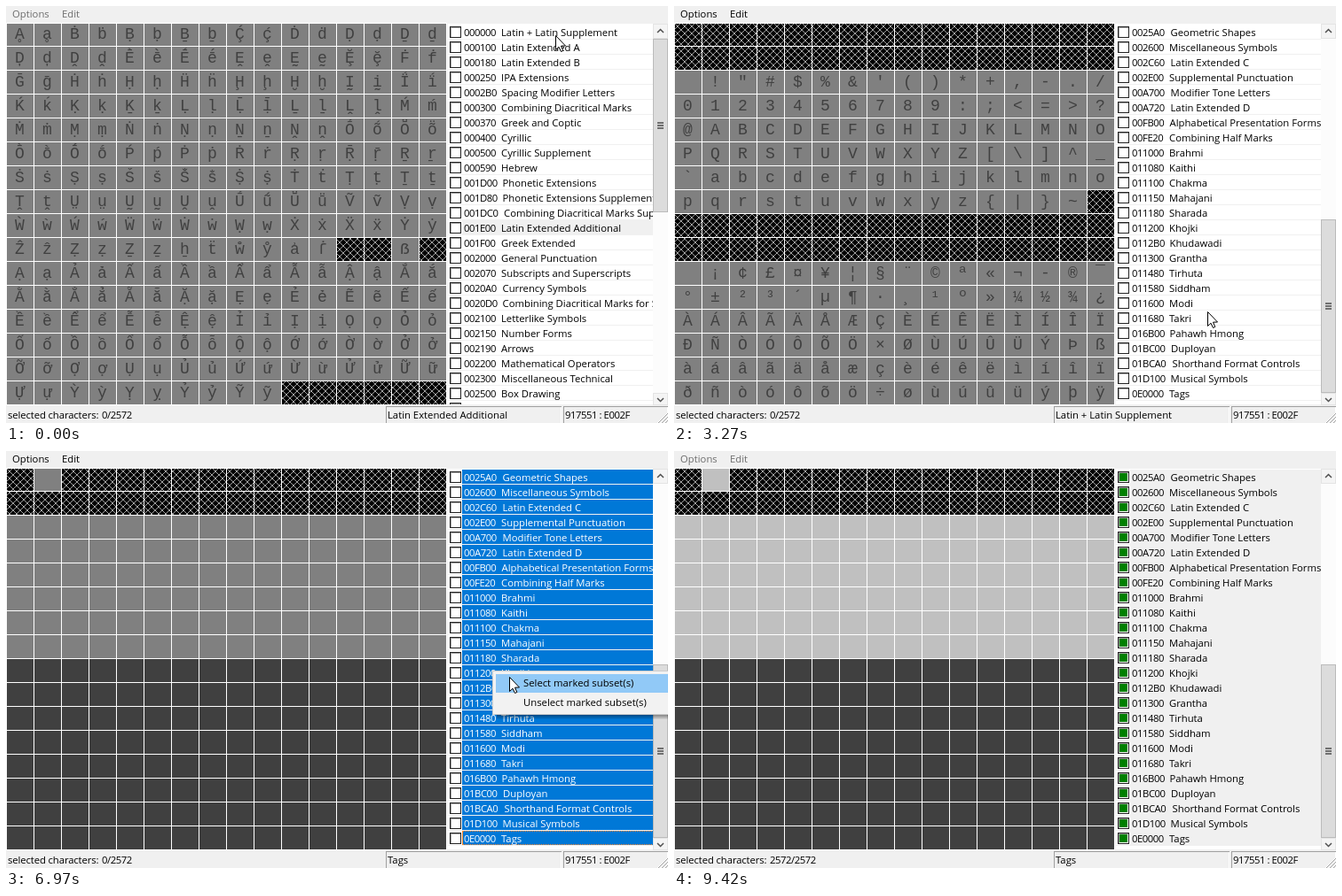
These frames come from a looping animation (746 px wide and 471 px high, 9500 ms). An HTML page with a canvas:

```html
<!DOCTYPE html>
<html lang="en">
<head>
<meta charset="utf-8">
<title>Character subset picker</title>
<style>
html, body { margin: 0; width: 100%; height: 100%; overflow: hidden; background: #f0f0f0; }
canvas { display: block; }
</style>
</head>
<body>
<canvas id="stage" width="746" height="471"></canvas>
<script>
const LOOP = 9500, ROW = 17, VISIBLE = 25, TOP = 21;
const UI = '11.3px "Open Sans", "Noto Sans", sans-serif';
const MONO = '18px "Liberation Mono", "DejaVu Sans Mono", monospace';
const GREY = '#f0f0f0', BLUE = '#0078d7';

const subsets = `000000 Latin + Latin Supplement
000100 Latin Extended A
000180 Latin Extended B
000250 IPA Extensions
0002B0 Spacing Modifier Letters
000300 Combining Diacritical Marks
000370 Greek and Coptic
000400 Cyrillic
000500 Cyrillic Supplement
000590 Hebrew
001D00 Phonetic Extensions
001D80 Phonetic Extensions Supplement
001DC0 Combining Diacritical Marks Supplement
001E00 Latin Extended Additional
001F00 Greek Extended
002000 General Punctuation
002070 Subscripts and Superscripts
0020A0 Currency Symbols
0020D0 Combining Diacritical Marks for Symbols
002100 Letterlike Symbols
002150 Number Forms
002190 Arrows
002200 Mathematical Operators
002300 Miscellaneous Technical
002500 Box Drawing
002580 Block Elements
0025A0 Geometric Shapes
002600 Miscellaneous Symbols
002C60 Latin Extended C
002E00 Supplemental Punctuation
00A700 Modifier Tone Letters
00A720 Latin Extended D
00FB00 Alphabetical Presentation Forms
00FE20 Combining Half Marks
011000 Brahmi
011080 Kaithi
011100 Chakma
011150 Mahajani
011180 Sharada
011200 Khojki
0112B0 Khudawadi
011300 Grantha
011480 Tirhuta
011580 Siddham
011600 Modi
011680 Takri
016B00 Pahawh Hmong
01BC00 Duployan
01BCA0 Shorthand Format Controls
01D100 Musical Symbols
0E0000 Tags`.split('\n').map(line => [line.slice(0, 6), line.slice(7)]);
const LAST = subsets.length - 1;

// Cursor tip: time, x, y
const path = [
  [1380, 619, 33], [2020, 618, 54], [2640, 618, 54], [3270, 601, 345],
  [3390, 591, 395], [3420, 590, 395], [3580, 573, 431], [3900, 573, 431],
  [4020, 569, 440], [5480, 569, 440], [5920, 548, 248], [6750, 548, 248],
  [7120, 579, 259], [8410, 579, 259], [8880, 683, 475]
];

const ctx = document.getElementById('stage').getContext('2d', { alpha: false });

function box(x, y, w, h, color) {
  ctx.fillStyle = color;
  ctx.fillRect(x, y, w, h);
}

function frame(x, y, w, h, fill, edge) {
  box(x, y, w, h, edge);
  box(x + 1, y + 1, w - 2, h - 2, fill);
}

function text(s, x, y, color = '#000', spacing = 0) {
  ctx.font = UI;
  ctx.letterSpacing = spacing + 'px';
  ctx.fillStyle = color;
  ctx.fillText(s, x, y);
  ctx.letterSpacing = '0px';
}

const digits = (s, x, y, color) => text(s, x, y, color, -0.45);

function line(points, color, width = 1) {
  ctx.beginPath();
  points.forEach(([x, y]) => ctx.lineTo(x, y));
  ctx.strokeStyle = color;
  ctx.lineWidth = width;
  ctx.stroke();
}

function makeHatch() {
  const tile = document.createElement('canvas');
  tile.width = tile.height = 8;
  const c = tile.getContext('2d');
  c.fillRect(0, 0, 8, 8);
  c.fillStyle = '#a0a0a0';
  for (let i = 0; i < 8; i++) {
    c.fillRect(i, i, 1, 1);
    c.fillRect(7 - i, i, 1, 1);
  }
  const pattern = ctx.createPattern(tile, 'repeat');
  pattern.setTransform(new DOMMatrix().translate(0, 19));
  return pattern;
}
const hatch = makeHatch();

function isEmpty(page, i) {
  if (page === 0) return i < 32 || (i >= 127 && i < 160);
  if (page === LAST) return i < 32 && i !== 1;
  return [0x9c, 0x9d, 0x9f].includes(i) || i >= 0xfa;
}

function drawGrid(page, checked) {
  box(0, 19, 497, 432, '#fff');
  ctx.font = MONO;
  ctx.textAlign = 'center';
  const base = parseInt(subsets[page][0], 16);
  for (let i = 0; i < 256; i++) {
    const x = i % 16 * 31, y = 18 + (i >> 4) * 27;
    const outside = page === LAST && i > 127;
    box(x + 1, y + 1, 30, 26,
      isEmpty(page, i) ? hatch : outside ? '#404040' : checked ? '#c0c0c0' : '#808080');
    if (page === LAST || isEmpty(page, i)) continue;
    const code = base + i;
    ctx.fillStyle = '#404040';
    ctx.fillText(code === 0xad ? '-' : String.fromCodePoint(code), x + 15.5, y + 19);
  }
  ctx.textAlign = 'left';
  box(0, 19, 497, 1, '#fff');
}

function drawCheckbox(y, checked) {
  frame(500, y, 13, 13, '#fff', '#222');
  box(501, y + 1, 11, 1, '#a0a0a0');
  box(501, y + 1, 1, 11, '#a0a0a0');
  if (checked) box(502, y + 2, 9, 9, '#008000');
}

function drawList(s) {
  ctx.save();
  ctx.beginPath();
  ctx.rect(498, 20, 231, 430);
  ctx.clip();
  box(498, 20, 231, 430, '#fff');
  for (let i = 0; i <= VISIBLE; i++) {
    const n = s.scroll + i, y = TOP + i * ROW;
    if (n > LAST) break;
    const [code, name] = subsets[n];
    const marked = s.all || n === s.row;
    const color = marked && s.active ? '#fff' : '#000';
    box(498, y + 16, 231, 1, GREY);
    if (marked) box(514, y, 215, 16, s.active ? BLUE : GREY);
    if (s.all && s.active && n === LAST) {
      ctx.setLineDash([1, 1]);
      line([[515, y + 0.5], [729, y + 0.5]], '#ff8728');
      line([[515, y + 15.5], [729, y + 15.5]], '#ff8728');
      ctx.setLineDash([]);
      box(514, y, 1, 16, '#ff8728');
    }
    drawCheckbox(y + 2, s.checked);
    // Wide hex letters push the label to the right
    const shift = [...code].reduce((sum, c) => sum + ('ACD'.includes(c) ? 1.5 : c === 'B' ? 0.5 : 0), 0);
    digits(code, 516, y + 13, color);
    text(name, 558 + shift, y + 13, color);
  }
  ctx.restore();
}

function drawScrollbar(scroll) {
  box(729, 20, 17, 430, '#fcfcfc');
  frame(729, 20, 17, 17, '#f4f4f4', '#e4e4e4');
  frame(729, 437, 17, 14, '#f4f4f4', '#e4e4e4');
  line([[734, 30], [737.5, 26.5], [741, 30]], '#505050', 1.5);
  line([[734, 443], [737.5, 446.5], [741, 443]], '#505050', 1.5);
  const y = Math.round(37 + scroll * 400 / subsets.length);
  frame(729, y, 17, 196, '#dcdcdc', '#bbb');
  for (let i = 0; i < 3; i++) box(734, y + 94 + i * 3, 7, 2, '#707070');
}

function drawStatus(s) {
  box(0, 451, 746, 20, GREY);
  text('selected characters:', 2, 466, '#000', -0.1);
  digits((s.checked ? 2572 : 0) + '/2572', 108, 466);
  for (const [x, w] of [[428, 198], [628, 118]]) {
    box(x, 452, w, 1, '#a0a0a0');
    box(x, 452, 1, 19, '#a0a0a0');
    box(x + w - 1, 453, 1, 18, '#fff');
  }
  text(subsets[s.page][1], 430, 466);
  digits('917551 : E002F', 630, 466);
  for (let d = 3; d < 14; d += 4) {
    line([[746 - d, 471], [746, 471 - d]], '#a0a0a0');
    line([[745 - d, 471], [746, 470 - d]], '#fff');
  }
}

function drawMenu(t) {
  if (t < 6350 || t >= 8040) return;
  const open = t < 7770;
  ctx.globalAlpha = open ? Math.min(1, 0.25 + 0.75 * (t - 6350) / 130) : 0.87 * (1 - (t - 7770) / 270);
  if (open) {
    for (let i = 0; i < 5; i++) box(553, 298 + i, 193, 1, `rgba(0,0,0,${0.36 - i * 0.07})`);
    frame(548, 248, 220, 50, '#f2f2f2', '#ccc');
    text('Unselect marked subset(s)', 583, 288);
  }
  if (t > 6800) box(552, 252, 194, 21, '#91c9f7');
  text('Select marked subset(s)', 583, 266);
  ctx.globalAlpha = 1;
}

function cursorAt(t) {
  if (t <= path[0][0]) return path[0].slice(1);
  const i = path.findIndex(p => p[0] > t);
  const [t0, x0, y0] = path[i - 1], [t1, x1, y1] = path[i];
  const k = (t - t0) / (t1 - t0);
  return [Math.round(x0 + (x1 - x0) * k), Math.round(y0 + (y1 - y0) * k)];
}

function drawCursor(t) {
  if (t >= 8880) return;
  const [x, y] = cursorAt(t);
  ctx.save();
  ctx.translate(x + 0.5, y + 0.5);
  ctx.beginPath();
  [[0, 0], [0, 16], [3.5, 12.7], [6, 18], [8.3, 17], [6, 11.7], [11, 11.5]]
    .forEach(p => ctx.lineTo(...p));
  ctx.closePath();
  ctx.fillStyle = '#fff';
  ctx.fill();
  ctx.strokeStyle = '#000';
  ctx.lineWidth = 1;
  ctx.stroke();
  ctx.restore();
}

function scrollAt(t) {
  if (t < 1380) return 0;
  if (t < 2460) return Math.min(21, 3 + 3 * Math.floor(6 * (t - 1380) / 640));
  return t < 2560 ? 24 : 26;
}

function draw(t) {
  const state = {
    active: t >= 310 && t < 9420,
    row: t < 360 ? 13 : 0,
    all: t >= 4240,
    page: t < 360 ? 13 : t < 4255 ? 0 : LAST,
    checked: t >= 7770,
    scroll: scrollAt(t)
  };
  box(0, 0, 746, 471, GREY);
  const ink = state.active ? '#000' : '#6d6d6d';
  text('Options', 7, 13, ink);
  text('Edit', 63, 13, ink);
  drawGrid(state.page, state.checked);
  drawList(state);
  drawScrollbar(state.scroll);
  drawStatus(state);
  drawMenu(t);
  drawCursor(t);
}

const start = performance.now();
function tick() {
  draw((performance.now() - start) % LOOP);
  requestAnimationFrame(tick);
}
tick();
</script>
</body>
</html>
```
